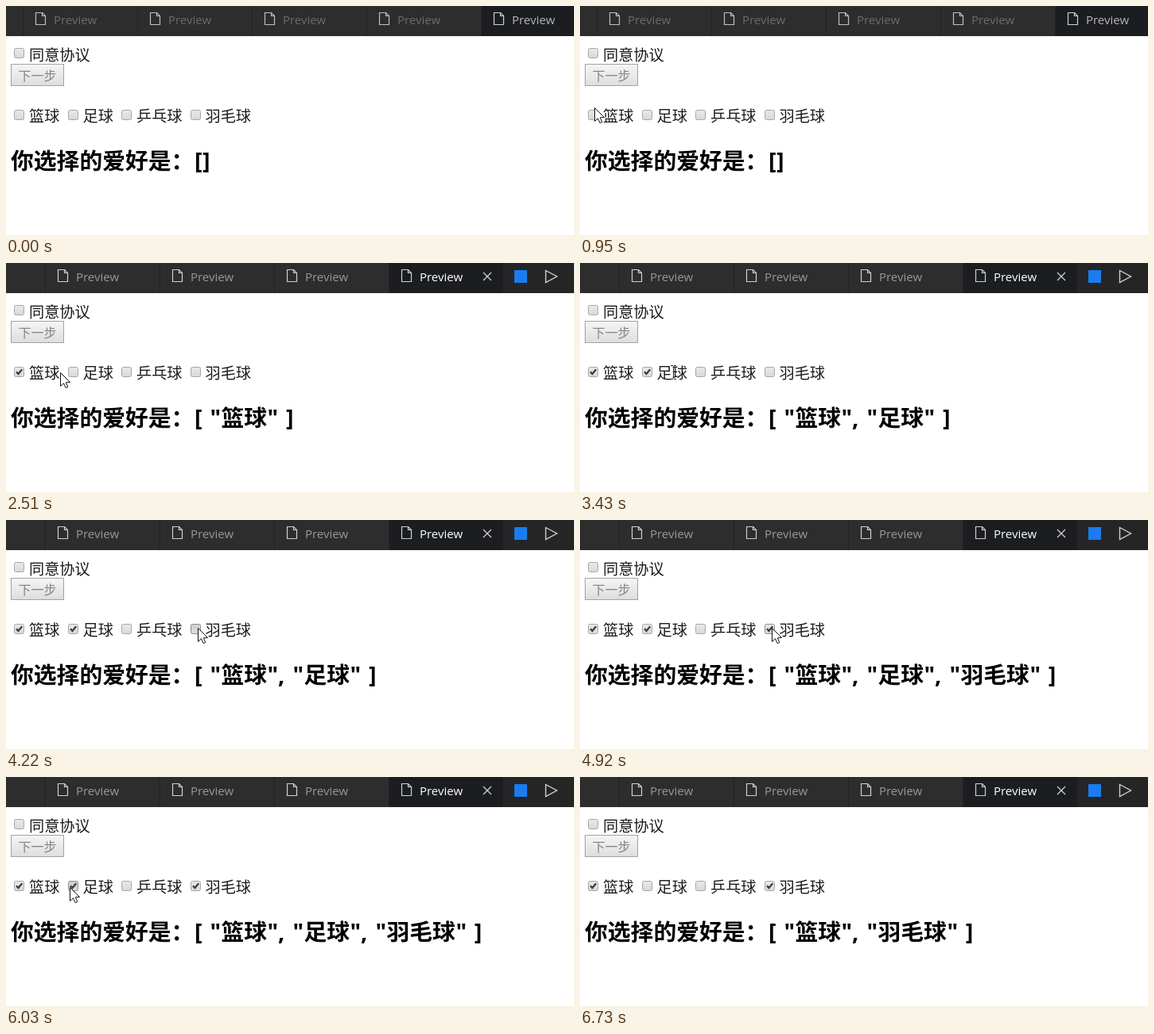
An HTML page with a canvas that plays this animation: 714 by 289 pixels, repeating every 7.69 s.

```html
<!DOCTYPE html>
<html lang="zh-CN">
<head>
<meta charset="utf-8">
<title>Preview</title>
<style>
  html, body { margin: 0; width: 100%; height: 100%; overflow: hidden; background: #fff; }
  canvas { display: block; }
</style>
</head>
<body>
<canvas id="stage" width="714" height="289"></canvas>
<script>
const ctx = document.getElementById('stage').getContext('2d');
const LOOP = 7690, STEP = 77, FOCUS_AT = 1650;
const CJK = '"Noto Sans CJK SC", "Noto Sans CJK", sans-serif';
const LATIN = '"Open Sans", "Noto Sans", sans-serif';
const LABEL_FONT = '350 19.2px ' + CJK, LABEL_COLOR = '#1a1a1a';

// Checkbox x, label x, label, time checked, time unchecked
const hobbies = [
  { x: 10, tx: 29, name: '篮球', on: 1730, off: LOOP },
  { x: 78, tx: 96.5, name: '足球', on: 2890, off: 6100 },
  { x: 145, tx: 164, name: '乒乓球', on: LOOP, off: LOOP },
  { x: 232, tx: 250.5, name: '羽毛球', on: 4290, off: LOOP }
];

// Pointer moves: start time, number of steps, target x, target y
const startPos = [178, 263];
const moves = [
  [550, 6, 18, 128], [1020, 3, 14, 138], [2030, 9, 84, 138],
  [3430, 1, 117, 138], [3510, 3, 243, 134], [4050, 1, 242, 135],
  [4220, 1, 241, 136], [5000, 2, 232, 139], [5240, 3, 65, 143],
  [5560, 5, 80, 139], [6500, 3, 247, 251]
];
const POINTER_END = 6730;

function pointerAt(t) {
  if (t < moves[0][0] || t >= POINTER_END) return null;
  let [x, y] = startPos;
  moves.forEach(([start, steps, tx, ty], i) => {
    if (t < start) return;
    const p = Math.min(1, (Math.floor((t - start) / STEP) + 1) / steps);
    const k = i ? p : 1 - (1 - p) ** 2;
    x += (tx - x) * k;
    y += (ty - y) * k;
  });
  return { x: Math.round(x), y: Math.round(y) };
}

function text(str, x, y, font, color) {
  ctx.font = font;
  ctx.fillStyle = color;
  ctx.fillText(str, x, y);
}

function rect(x, y, w, h, color) {
  ctx.fillStyle = color;
  ctx.fillRect(x, y, w, h);
}

function line(points, color, width = 1, close = false) {
  ctx.beginPath();
  points.forEach(([x, y]) => ctx.lineTo(x, y));
  if (close) ctx.closePath();
  ctx.strokeStyle = color;
  ctx.lineWidth = width;
  ctx.stroke();
}

function shade(y, h, top, bottom) {
  const g = ctx.createLinearGradient(0, y, 0, y + h);
  g.addColorStop(0, top);
  g.addColorStop(1, bottom);
  return g;
}

function fileIcon(x, y, color) {
  line([[x, y], [x + 8, y], [x + 12, y + 4], [x + 12, y + 15], [x, y + 15]], color, 1.2, true);
  line([[x + 8, y], [x + 8, y + 4], [x + 12, y + 4]], color, 1.2);
}

function tabBar(focused) {
  const left = focused ? 50 : 22;
  const active = focused ? 3 : 4;
  rect(0, 0, 714, 38, focused ? '#252526' : '#2d2d2d');
  rect(0, 0, left, 38, '#2d2d2d');
  for (let i = 0; i <= active; i++) {
    const x = left + i * 144, current = i === active;
    rect(x, 0, 143, 38, current ? '#1b1d21' : '#2d2d2d');
    rect(x - 1, 0, 1, 38, '#232324');
    const color = focused ? (current ? '#ffffff' : '#989898') : (current ? '#b4b4b4' : '#6b6b6b');
    fileIcon(x + 15.5, 8.5, focused || current ? '#d0d0d0' : '#c0c0c0');
    text('Preview', x + 38, 23, '500 15px ' + LATIN, color);
  }
  if (!focused) return;
  line([[600, 12], [610, 22]], '#d0d0d0', 1.3);
  line([[610, 12], [600, 22]], '#d0d0d0', 1.3);
  rect(639, 9, 16, 16, '#1a7cf0');
  line([[678.5, 9.5], [692.5, 17], [678.5, 24.5]], '#d0d0d0', 1.4, true);
}

function checkbox(x, y, checked, hover, pressed) {
  ctx.beginPath();
  ctx.roundRect(x + .5, y + .5, 12, 12, 2);
  ctx.fillStyle = pressed ? shade(y, 13, '#cecece', '#dcdcdc') : shade(y, 13, '#eaeaea', '#d8d8d8');
  ctx.fill();
  ctx.strokeStyle = hover ? '#8c8c8c' : '#a6a6a6';
  ctx.lineWidth = 1;
  ctx.stroke();
  if (checked) line([[x + 3, y + 6.3], [x + 5.4, y + 9], [x + 10.2, y + 3.2]], '#3c3c3c', 2.2);
}

function button() {
  rect(6, 73, 67, 28, '#a2a2a2');
  rect(7, 74, 65, 26, shade(74, 26, '#f5f5f5', '#dedede'));
  text('下一步', 15.5, 94, '350 16px ' + CJK, '#858585');
}

function heading(list) {
  const cjk = 'bold 28.8px ' + CJK, latin = 'bold 28.8px ' + LATIN;
  const put = (s, x, font = latin) => text(s, x, 205.5, font, '#000');
  put('你选择的爱好是：', 6, cjk);
  put('[', 237);
  if (!list.length) return put(']', 247);
  let x = 256.5;
  list.forEach((name, i) => {
    const end = x + 14 + name.length * 28.8;
    put('"', x);
    put(name, x + 14, cjk);
    put('"', end + .5);
    if (i < list.length - 1) put(',', end + 14);
    x = end + 32.4;
  });
  put(']', x - 8.5);
}

function arrow({ x, y }) {
  ctx.beginPath();
  [[0, 0], [0, 17], [4, 13.3], [6.6, 19.2], [9.3, 18], [6.8, 12.3], [12, 12]]
    .forEach(([dx, dy]) => ctx.lineTo(x + dx + .5, y + dy + .5));
  ctx.closePath();
  ctx.fillStyle = '#fff';
  ctx.fill();
  ctx.strokeStyle = '#111';
  ctx.lineWidth = 1;
  ctx.stroke();
}

function beam({ x, y }) {
  const cx = x + .5;
  line([[cx, y - 7.5], [cx, y + 7.5]], '#222');
  for (const dy of [-8.5, 8.5]) {
    line([[cx - 3.5, y + dy], [cx - .5, y + dy]], '#222');
    line([[cx + .5, y + dy], [cx + 3.5, y + dy]], '#222');
  }
}

function draw(t) {
  const pointer = pointerAt(t);
  const within = (x, w, y, h) => pointer && pointer.x >= x && pointer.x < x + w
    && pointer.y >= y && pointer.y < y + h;

  rect(0, 0, 714, 289, '#fff');
  tabBar(t >= FOCUS_AT);
  checkbox(10, 53, false);
  text('同意协议', 29, 68.6, LABEL_FONT, LABEL_COLOR);
  button();

  const chosen = [];
  let overText = false;
  for (const { x, tx, name, on, off } of hobbies) {
    const checked = t >= on && t < off;
    const pressed = (t >= on - 80 && t < on) || (t >= off - 70 && t < off && off < LOOP);
    if (checked) chosen.push(name);
    checkbox(x, 131, checked, within(x, 13, 131, 13), pressed && on < LOOP);
    text(name, tx, 146, LABEL_FONT, LABEL_COLOR);
    overText = overText || within(tx, name.length * 19.2, 129, 14);
  }
  heading(chosen);
  if (pointer) (overText ? beam : arrow)(pointer);
}

function tick() {
  draw(performance.now() % LOOP);
  requestAnimationFrame(tick);
}
tick();
</script>
</body>
</html>
```
